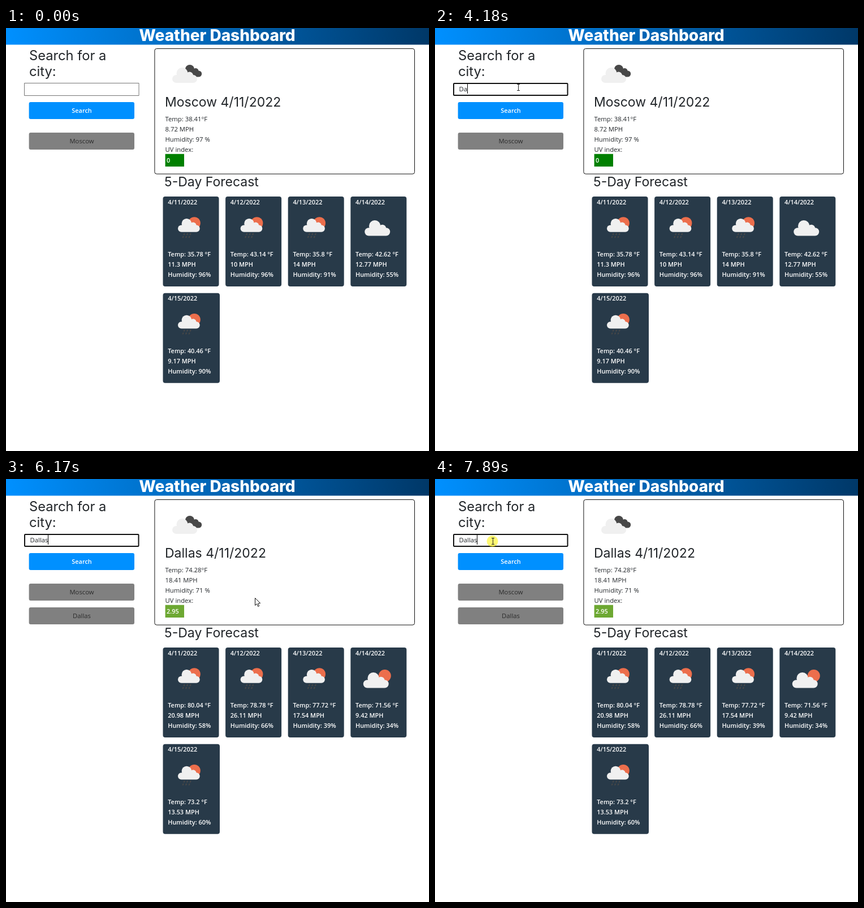
An HTML page with a canvas that plays this animation: 748x748 px, repeating every 8000 ms.

```html
<!DOCTYPE html>
<html lang="en">
<head>
<meta charset="utf-8">
<title>Weather Dashboard</title>
<style>
  html, body { margin: 0; width: 100%; height: 100%; overflow: hidden; background: #fff; }
  canvas { display: block; }
</style>
</head>
<body>
<canvas id="stage" width="748" height="748"></canvas>
<script>
const ctx = document.getElementById('stage').getContext('2d');
const LOOP = 8000;
const BODY = '"Open Sans", "Noto Sans", sans-serif';
const HEAD = 'Inter, Roboto, sans-serif';
const INK = '#212529', PALE = '#f0f0f0', DARK = '#484848', SUN = '#ec6e4c';

const cities = {
  Moscow: {
    now: ['38.41', '8.72', '97'], uv: '0', uvColor: '#008000',
    days: [['35.78', '11.3', 96], ['43.14', '10', 96], ['35.8', '14', 91], ['42.62', '12.77', 55], ['40.46', '9.17', 90]]
  },
  Dallas: {
    now: ['74.28', '18.41', '71'], uv: '2.95', uvColor: '#6da832',
    days: [['80.04', '20.98', 58], ['78.78', '26.11', 66], ['77.72', '17.54', 39], ['71.56', '9.42', 34], ['73.2', '13.53', 60]]
  }
};

// Timelines: [start, value...]; each entry holds until the next one.
const typing = [
  [0, ''], [2190, 'D'], [2650, 'Das'], [3380, 'Da'], [3580, 'D'], [4180, 'Da'],
  [4380, 'Dal'], [4490, 'Dall'], [4600, 'Dalla'], [4710, 'Dallas']
];
const caret = [
  [0, false], [1130, true], [1660, false], [2190, true], [3180, false], [3710, true],
  [5240, false], [5770, true], [6300, false], [6830, true], [7360, false], [7890, true]
];
const mouse = [
  [0, 'none'],
  [380, 'arrow', 650, 670], [450, 'arrow', 545, 560], [510, 'arrow', 400, 415],
  [580, 'arrow', 255, 290], [650, 'arrow', 165, 205], [710, 'arrow', 134, 155],
  [780, 'arrow', 128, 121], [840, 'beam', 138, 111], [910, 'beam', 145, 108],
  [1050, 'beam', 147, 107], [1260, 'beam', 147, 105],
  [5770, 'beam', 160, 105], [5840, 'beam', 207, 105], [5910, 'arrow', 265, 97],
  [6040, 'arrow', 345, 79], [6100, 'arrow', 405, 130], [6170, 'arrow', 440, 210],
  [6240, 'arrow', 460, 295], [6300, 'arrow', 470, 365], [6370, 'arrow', 474, 405],
  [6430, 'arrow', 475, 425], [6500, 'arrow', 475, 432],
  [6700, 'arrow', 468, 425], [6760, 'arrow', 420, 383], [6830, 'arrow', 335, 304],
  [6890, 'arrow', 245, 222], [6960, 'arrow', 172, 164], [7030, 'arrow', 130, 132],
  [7090, 'beam', 112, 115], [7160, 'beam', 105, 107],
  [7500, 'beam', 103, 112], [7560, 'beam', 102, 116], [7760, 'beam', 102, 110]
];

function at(list, t) {
  let now = list[0];
  for (const item of list) if (item[0] <= t) now = item;
  return now.slice(1);
}

function text(str, x, y, color, font, align = 'left') {
  ctx.font = font;
  ctx.fillStyle = color;
  ctx.textAlign = align;
  ctx.fillText(str, x, y);
}
const body = (str, x, y, color = INK) => text(str, x, y, color, '400 11.3px ' + BODY);
const strong = (str, x, y, align) => text(str, x, y, '#fff', '600 10.9px ' + BODY, align);
const heading = (str, x, y, size = 23) => text(str, x, y, INK, `400 ${size}px ${HEAD}`);

function box(x, y, w, h, r, color) {
  ctx.beginPath();
  ctx.roundRect(x, y, w, h, r);
  ctx.fillStyle = color;
  ctx.fill();
}

function outline(x, y, w, h, r, color, width) {
  ctx.beginPath();
  ctx.roundRect(x + width / 2, y + width / 2, w - width, h - width, r);
  ctx.strokeStyle = color;
  ctx.lineWidth = width;
  ctx.stroke();
}

function disc(x, y, r, color) {
  ctx.beginPath();
  ctx.arc(x, y, r, 0, Math.PI * 2);
  ctx.fillStyle = color;
  ctx.fill();
}

function cloud(x, y, scale, color) {
  ctx.save();
  ctx.translate(x, y);
  ctx.scale(scale, scale);
  box(0, 13, 44, 14, 7, color);
  disc(17.5, 10, 10, color);
  disc(30.5, 14, 6.5, color);
  ctx.restore();
}

function rainIcon(x, y) {
  disc(x + 55.5, y + 47, 10.8, SUN);
  cloud(x + 26.5, y + 39, 0.88, PALE);
  ctx.strokeStyle = DARK;
  ctx.lineWidth = 2;
  ctx.beginPath();
  for (let i = 0; i < 6; i++) {
    const dx = x + 37.5 + (i % 3) * 5.5 - (i > 2 ? 2 : 0);
    const dy = y + (i > 2 ? 70 : 65);
    ctx.moveTo(dx + 0.8, dy);
    ctx.lineTo(dx - 0.6, dy + 3);
  }
  ctx.stroke();
}

function button(y, fill) {
  box(40.6, y, 186.4, 30, 3, fill);
}

function cityButton(name, y) {
  button(y, '#808080');
  text(name, 134, y + 19, '#2b2b2b', '400 11.3px ' + BODY, 'center');
}

function card(i, day, sunny) {
  const last = i === 4;
  const x = last ? 277.5 : 277.5 + i * 110.6;
  const y = last ? 468.7 : 298;
  const line = (str, dy) => strong(str, x + 8.7, y + dy);
  box(x, y, last ? 100.5 : 99, 159, 4, '#283a49');
  line(`4/${11 + i}/2022`, last ? 13 : 13.7);
  if (i === 3) {
    if (sunny) disc(x + 60.5, y + 50, 11, SUN);
    cloud(x + (sunny ? 22.5 : 25), y + (sunny ? 44 : 42), 1.02, PALE);
  } else {
    rainIcon(x, y);
  }
  line(`Temp: ${day[0]} °F`, 106);
  line(`${day[1]} MPH`, 124);
  line(`Humidity: ${day[2]}%`, 142);
}

function searchPanel(t) {
  const focused = t >= 1130;
  heading('Search for a', 41, 57, 23.7);
  heading('city:', 41, 84.5, 23.7);
  outline(32, 97, 203.5, 23, focused ? 1 : 0, focused ? '#101010' : '#767676', focused ? 2 : 1);

  const [typed] = at(typing, t);
  body(typed, 42.5, 112);
  if (at(caret, t)[0]) {
    ctx.fillStyle = '#000';
    ctx.fillRect(Math.round(42.1 + ctx.measureText(typed).width), 99, 1, 17);
  }
  button(131, '#0090ff');
  strong('Search', 134, 150, 'center');
  cityButton('Moscow', 185);
  if (t >= 5110) cityButton('Dallas', 227);
}

function weather(t) {
  const name = t >= 5770 ? 'Dallas' : 'Moscow';
  const city = cities[name];
  outline(262.4, 36, 460.6, 222.6, 3.5, '#111', 1);
  cloud(311, 65, 0.8, DARK);
  cloud(294, 70, 1, PALE);
  heading(name + ' 4/11/2022', 281, 139);
  body(`Temp: ${city.now[0]}°F`, 281.5, 164.5);
  body(`${city.now[1]} MPH`, 281.5, 183);
  body(`Humidity: ${city.now[2]} %`, 281.5, 200.5);
  body('UV index:', 281.5, 219);
  box(281.6, 222.7, 33.4, 22.3, 0, city.uvColor);
  strong(city.uv, 284, 238);
  heading('5-Day Forecast', 280, 280);
  city.days.forEach((day, i) => card(i, day, t >= 6040));
}

function arrow(x, y) {
  ctx.save();
  ctx.translate(x + 0.5, y + 0.5);
  ctx.beginPath();
  for (const [px, py] of [[0, 0], [0, 13], [3, 10.3], [5.2, 15], [7.2, 14], [5.2, 9.6], [9.2, 9.2]]) ctx.lineTo(px, py);
  ctx.closePath();
  ctx.fillStyle = '#fff';
  ctx.fill();
  ctx.strokeStyle = '#111';
  ctx.lineWidth = 1;
  ctx.stroke();
  ctx.restore();
}

function beam(x, y) {
  ctx.fillStyle = '#222';
  ctx.fillRect(x, y - 6, 1, 12);
  for (const dy of [-6, 5]) {
    ctx.fillRect(x - 2, y + dy, 2, 1);
    ctx.fillRect(x + 1, y + dy, 2, 1);
  }
}

function pointer(t) {
  const [kind, x, y] = at(mouse, t);
  const pressed = (t >= 1130 && t < 1190) || t >= 7830;
  if (pressed) disc(x - 0.5, y, 10, 'rgba(255, 245, 20, 0.6)');
  if (kind === 'arrow') arrow(x, y);
  if (kind === 'beam') beam(x, y);
}

function draw(t) {
  ctx.fillStyle = '#fff';
  ctx.fillRect(0, 0, 748, 748);
  const sky = ctx.createLinearGradient(0, 0, 748, 0);
  sky.addColorStop(0, '#0090ff');
  sky.addColorStop(1, '#003868');
  ctx.fillStyle = sky;
  ctx.fillRect(0, 0, 748, 29.5);
  text('Weather Dashboard', 373.5, 22.5, '#fff', '800 28px ' + HEAD, 'center');
  searchPanel(t);
  weather(t);
  pointer(t);
}

const start = performance.now();
function tick() {
  draw((performance.now() - start) % LOOP);
  requestAnimationFrame(tick);
}
tick();
</script>
</body>
</html>
```
